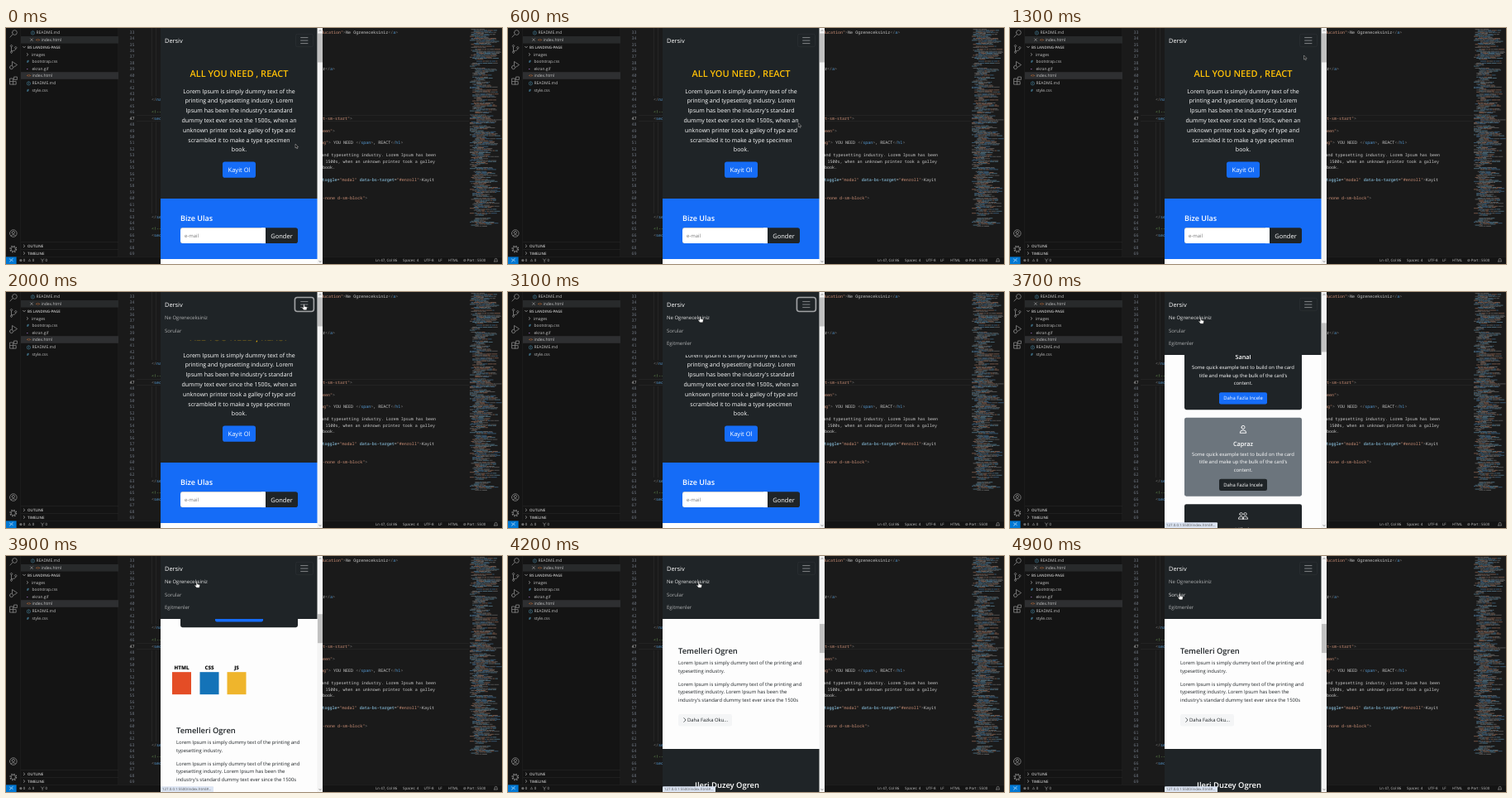
An HTML page that plays this animation: 600 px wide and 285 px high, repeating every 5000 ms.

```html
<!DOCTYPE html>
<html lang="tr">
<head>
<meta charset="utf-8">
<title>Landing page</title>
<style>
html, body { margin: 0; width: 100%; height: 100%; overflow: hidden; background: #1a1a1a; }
svg { display: block; }
text { font-family: "Open Sans", "Noto Sans", sans-serif; white-space: pre; text-rendering: geometricPrecision; }
.code { font-family: "Noto Sans Mono", "DejaVu Sans Mono", monospace; font-size: 5.02px; }
.mid { text-anchor: middle; }
.semi { font-weight: 600; }
.bold { font-weight: 800; }
</style>
</head>
<body>
<svg id="stage" width="600" height="285" viewBox="0 0 600 285"></svg>
<script>
const DARK = '#1f2427', BLUE = '#156cf7', WHITE = '#fff';
const stage = document.getElementById('stage');

// y is the visual middle of the line
const text = (x, y, str, size, fill, cls = '') =>
  `<text x="${x}" y="${y + size * 0.34}" font-size="${size}" fill="${fill}" class="${cls}">${str}</text>`;
const rect = (x, y, w, h, fill, r = 0) =>
  `<rect x="${x}" y="${y}" width="${w}" height="${h}" rx="${r}" fill="${fill}"/>`;
const line = (d, color, width = 0.8) =>
  `<path d="${d}" fill="none" stroke="${color}" stroke-width="${width}" stroke-linecap="round" stroke-linejoin="round"/>`;
const lines = (x, y, step, list, ...style) =>
  list.map((str, i) => text(x, y + i * step, str, ...style)).join('');

// ---------- code editor ----------
const rowY = n => 109 + (n - 47) * 7.43;
const escape = s => s.replace(/</g, '&lt;');
const INK = { s: '#ce9178', g: '#808080', w: '#cccccc', b: '#569cd6', a: '#9cdcfe', c: '#6a9955' };
// parts alternate colour key and string
function code(x, row, ...parts) {
  let spans = '';
  for (let i = 0; i < parts.length; i += 2)
    spans += `<tspan fill="${INK[parts[i]]}">${escape(parts[i + 1])}</tspan>`;
  return `<text class="code" x="${x}" y="${rowY(row) + 1.7}">${spans}</text>`;
}
const close = tag => ['g', '</', 'b', tag, 'g', '>'];

function minimap() {
  let seed = 7, out = '';
  const rnd = () => (seed = seed * 16807 % 2147483647) / 2147483647;
  const inks = ['#b07f68', '#4f82ab', '#8d8d8d', '#777', '#6c9fb8'];
  for (let y = 0.5; y < 240; y += 1.2) {
    if (rnd() < 0.1) continue;
    let x = 561 + Math.floor(rnd() * 6) * 1.6;
    const end = x + 6 + rnd() * 26;
    while (x < end && x < 593) {
      const w = 1.5 + rnd() * 6;
      out += `<path d="M${x.toFixed(1)} ${y.toFixed(1)}h${w.toFixed(1)}" stroke="${inks[Math.floor(rnd() * 5)]}" stroke-width=".75" opacity=".75"/>`;
      x += w + 0.5;
    }
  }
  return out;
}

function editor() {
  let out = rect(136, 0, 464, 276, '#1a1a1a');
  for (const x of [176, 181.5]) out += rect(x, 0, 0.5, 82, '#303030') + rect(x, 114, 0.5, 110, '#303030');
  out += rect(158, 105.2, 402, 0.4, '#303030') + rect(158, 112.6, 402, 0.4, '#303030');
  for (let n = 33; n < 70; n++)
    out += `<text class="code" x="149.5" y="${rowY(n) + 1.7}" fill="${n === 47 ? '#ccc' : '#6e7681'}">${n}</text>`;
  out += code(176, 44, ...close('nav')) + code(176, 46, 'c', '<!-- hero -->') +
    code(176, 47, 'g', '<', 'b', 'section') + code(176, 63, ...close('section')) +
    code(176, 65, 'c', '<!-- mail -->') + code(176, 66, 'g', '<', 'b', 'section') +
    code(381, 33, 's', 'ducation"', 'g', '>', 'w', 'Ne Ogreneceksiniz', ...close('a')) +
    code(380, 39, 'w', 'ar', ...close('a')) +
    code(383, 47, 's', 't-sm-start"', 'g', '>') +
    code(383, 49, 's', 'een"', 'g', '>') +
    code(381, 51, 's', 'ng"', 'g', '>', 'w', ' YOU NEED ', ...close('span'), 'w', ', REACT', ...close('h1')) +
    code(381.5, 53, 'w', 'and typesetting industry. Lorem Ipsum has been') +
    code(386.5, 54, 'w', '1500s, when an unknown printer took a galley') +
    code(383, 55, 'w', 'book.') +
    code(382.5, 57, 'a', 'toggle', 'w', '=', 's', '"modal"', 'a', ' data-bs-target', 'w', '=', 's', '"#enroll"', 'g', '>', 'w', 'Kayit') +
    code(383, 60, 's', '-none d-sm-block"', 'g', '>');
  return out + minimap();
}

function sidebar() {
  const ink = '#c4c4c4', dim = '#8a8a8a', size = 4.95;
  const file = (x, y, icon, color, name) =>
    text(x - 6.5, y, icon, 4.5, color, 'semi') + text(x, y, name, size, ink);
  const down = (x, y) => line(`M${x - 1.4} ${y - 0.7}l1.4 1.5 1.4-1.5`, ink, 0.6);
  const right = (x, y) => line(`M${x - 0.7} ${y - 1.4}l1.5 1.4-1.5 1.4`, ink, 0.6);
  return rect(0, 0, 136, 276, '#141414') + rect(17.6, 0, 0.4, 276, '#262626') + rect(135.6, 0, 0.4, 276, '#262626') +
    rect(18, 10, 118, 8.6, '#282a2b') + rect(18, 53.2, 118, 8.6, '#2e2f31') +
    file(36.5, 5.2, 'ⓘ', '#519aba', 'README.md') +
    line('M29.6 12.8l2.8 2.8m0-2.8l-2.8 2.8', ink, 0.5) + file(42.5, 14.2, '&lt;&gt;', '#e37933', 'index.html') +
    down(22, 23) + text(26, 23, 'BS LANDING-PAGE', 4.5, ink, 'semi') +
    right(26, 32) + text(31, 32, 'images', size, ink) +
    file(31.5, 40.4, '#', '#519aba', 'bootstrap.css') + file(31.5, 49, '▪', '#a074c4', 'ekran.gif') +
    file(31.5, 57.5, '&lt;&gt;', '#e37933', 'index.html') + file(31.5, 66, 'ⓘ', '#519aba', 'README.md') +
    file(31.5, 75, '#', '#519aba', 'style.css') +
    rect(18, 258.6, 118, 0.4, '#303030') + rect(18, 267.3, 118, 0.4, '#303030') +
    right(22, 263.3) + text(26, 263.3, 'OUTLINE', 4.5, ink, 'semi') +
    right(22, 272) + text(26, 272, 'TIMELINE', 4.5, ink, 'semi') +
    // activity icons
    line('M5 11l3-3.2M7.5 5.5a2.9 2.9 0 1 0 5.8 0a2.9 2.9 0 1 0-5.8 0', dim) +
    line('M6.5 23v5M6.5 22.9a1.2 1.2 0 1 1 .1 0M6.5 30.4a1.2 1.2 0 1 1 .1 0M11.7 25a1.2 1.2 0 1 1 .1 0q0 2.6-5.2 2.8', dim) +
    line('M7.5 45v-4.5l6 4-4 2.8M4.5 47.5a2 2.2 0 1 0 4 0a2 2.2 0 1 0-4 0', dim) +
    line('M5 61h3.6v3.6h3.6v3.5H5zM5 64.6h3.6v3.5M10 59h3.4v3.4H10z', dim) +
    line('M4.5 248a4.3 4.3 0 1 0 8.6 0a4.3 4.3 0 1 0-8.6 0M7.2 247a1.6 1.6 0 1 0 3.2 0a1.6 1.6 0 1 0-3.2 0M6 251q2.8-3 5.6 0', dim) +
    `<circle cx="8.8" cy="267" r="3.8" fill="none" stroke="${dim}" stroke-width="1.2" stroke-dasharray="1.5 1.48"/>` +
    `<circle cx="8.8" cy="267" r="2.7" fill="none" stroke="${dim}" stroke-width=".8"/>`;
}

function statusBar() {
  const put = (x, str) => text(x, 280.4, str, 4.45, '#c4c4c4');
  return rect(0, 276, 600, 9, '#141414') + rect(0, 276, 600, 0.4, '#2b2b2b') + rect(0, 276.4, 12.6, 8.6, '#0078d4') +
    line('M4.5 279l1.8 1.6-1.8 1.6M8.3 278.4l-1.8 1.6 1.8 1.6', WHITE, 0.6) +
    put(16, '⊗ 0') + put(26.5, '⚠ 0') + line('M42.5 278.8l1.6 2 1.6-2M44.1 280.8v2', '#bdbdbd', 0.5) + put(47.5, '0') +
    put(447, 'Ln 47, Col 86') + put(480, 'Spaces: 4') + put(505.5, 'UTF-8') + put(523, 'LF') + put(535, 'HTML') +
    put(553, '⊘ Port : 5500') + line('M590.6 282h4l-.6-1v-1.2q0-1.4-1.4-1.4t-1.4 1.4v1.2z', '#bdbdbd', 0.5);
}

// ---------- web page ----------
const person = (x, y, s = 1) =>
  `<g transform="translate(${x} ${y}) scale(${s})">` +
  line('M-2-2.3a2 2 0 1 0 4 0a2 2 0 1 0-4 0M-3.8 4.2q0-3 3.8-3t3.8 3z', WHITE, 0.9) + '</g>';
const laptop = y => line(`M278.5 ${y + 2}v-5.5h7v5.5M277 ${y + 3.4}h10`, WHITE, 0.9);

function card(y, title, icon, fill, button) {
  return rect(211, y, 142, 95, fill, 2.4) + icon +
    text(282, y + 31.5, title, 7.3, WHITE, 'mid semi') +
    lines(282, y + 44, 9.5, ['Some quick example text to build on the card', "title and make up the bulk of the card's", 'content.'], 5.9, WHITE, 'mid') +
    rect(253, y + 74, 58, 14.3, button, 2.2) + text(282, y + 81.2, 'Daha Fazla Incele', 5.9, WHITE, 'mid');
}

function page() {
  const badge = (x, name, color) =>
    text(x + 11.5, 651, name, 6.2, '#111', 'mid bold') + rect(x, 656, 23, 27, color);
  return rect(187, 0, 190, 206, DARK) +
    text(282, 54.8, 'ALL YOU NEED , REACT', 11, '#ffc107', 'mid semi') +
    lines(282, 76.3, 11.8, [
      'Lorem Ipsum is simply dummy text of the', 'printing and typesetting industry. Lorem',
      "Ipsum has been the industry's standard", 'dummy text ever since the 1500s, when an',
      'unknown printer took a galley of type and', 'scrambled it to make a type specimen', 'book.'
    ], 7, WHITE, 'mid') +
    rect(262, 161.5, 40, 19.2, BLUE, 2.8) + text(282, 171.3, 'Kayit Ol', 7.5, WHITE, 'mid') +
    rect(187, 206, 190, 73, BLUE) + text(211, 230.4, 'Bize Ulas', 9, WHITE, 'semi') +
    rect(211, 241.3, 142, 18.8, DARK, 2.8) + rect(211, 241.3, 103, 18.8, WHITE, 2.4) + rect(309, 241.3, 5, 18.8, WHITE) +
    text(216, 251.2, 'e-mail', 5.9, '#777') + text(333.5, 251, 'Gonder', 7.5, WHITE, 'mid') +
    card(298, 'Sanal', laptop(312), DARK, BLUE) +
    card(402.5, 'Capraz', person(282, 416.5), '#6c757d', DARK) +
    card(507, 'Hibrit', person(279.5, 521, 0.85) + person(284.5, 521, 0.85), DARK, BLUE) +
    badge(201, 'HTML', '#e44d26') + badge(234.5, 'CSS', '#1473b8') + badge(267.5, 'JS', '#efb52c') +
    text(206, 727, 'Temelleri Ogren', 9.35, DARK, 'semi') +
    lines(206, 741.3, 9.4, ['Lorem Ipsum is simply dummy text of the printing and', 'typesetting industry.'], 5.92, DARK) +
    lines(206, 766.7, 9.4, ['Lorem Ipsum is simply dummy text of the printing and', 'typesetting industry. Lorem Ipsum has been the', "industry's standard dummy text ever since the 1500s"], 5.92, DARK) +
    rect(206, 803, 65, 14.5, '#f4f5f6', 2.2) + line('M212.8 807.6l2.3 2.4-2.3 2.4', DARK, 0.7) +
    text(217, 810, 'Daha Fazka Oku...', 5.9, DARK) +
    rect(187, 845, 190, 80, DARK) + text(265, 889, 'Ileri Duzey Ogren', 9.38, WHITE, 'mid semi');
}

const LINKS = ['Ne Ogreneceksiniz', 'Sorular', 'Egitmenler'];
const linkY = i => 31 + i * 15.6;

stage.innerHTML = `
  <defs>
    <clipPath id="phone"><rect x="187" width="196" height="285"/></clipPath>
    <clipPath id="fold"><rect id="foldBox" x="187" width="190"/></clipPath>
  </defs>
  ${editor()}${sidebar()}${statusBar()}
  <g clip-path="url(#phone)">
    ${rect(187, 0, 196, 285, '#fdfdfd')}
    <g id="page">${page()}</g>
    <g clip-path="url(#fold)">
      ${rect(187, 0, 190, 76, DARK)}
      ${text(192, 15, 'Dersiv', 7.4, WHITE)}
      ${LINKS.map((s, i) => text(192, linkY(i), s, 6, WHITE, 'link')).join('')}
    </g>
    <rect x="350.5" y="7.3" width="21" height="15.4" rx="2" fill="none" stroke="#303538" stroke-width=".5"/>
    <rect id="ring" x="349.4" y="6.5" width="23" height="17" rx="3" fill="none" stroke="#a0a2a4" stroke-width="1.6"/>
    ${line('M356.6 11.6h8.4m-8.4 3.5h8.4m-8.4 3.5h8.4', '#9b9d9f', 0.8)}
    ${rect(376.5, 0, 6.5, 285, '#f4f4f4')}
    ${line('M378.8 3.8l1.2-1.4 1.2 1.4M378.8 281.4l1.2 1.4 1.2-1.4', '#777', 0.7)}
    <rect id="thumb" x="377" width="6" height="35" fill="#c1c1c1"/>
    <g id="status">${rect(187, 278.3, 64, 7, '#dbe4f3', 1)}${text(189, 281.8, '127.0.0.1:5500/index.html#...', 4.4, '#555')}</g>
  </g>
  <path id="arrow" d="M0 0v5l1.1-1 .8 1.8.9-.4-.8-1.7h1.6z" fill="#111" stroke="#ccc" stroke-width=".45"/>
  <path id="hand" d="M-.7 0q.8-.8 1.4 0v2.4l2.6.6q.6.3.4 1.2l-.6 2.6h-3.4l-2.3-2.7q.3-1 1.9 0z" fill="#fff" stroke="#111" stroke-width=".4"/>`;

// ---------- motion ----------
const el = id => document.getElementById(id);
const links = [...document.querySelectorAll('.link')];
const ease = (t, start, length) => {
  const k = Math.min(1, Math.max(0, (t - start) / length));
  return k * k * (3 - 2 * k);
};
// start, end, x, y reached at the end
const MOVES = [[300, 1250, 355.5, 33], [1350, 1700, 360.5, 15], [2350, 3050, 232.5, 30], [3100, 3400, 230.8, 31.5], [4350, 4800, 205.5, 46]];

function pointer(t) {
  let x = 350, y = 140;
  for (const [a, b, toX, toY] of MOVES) {
    const k = ease(t, a, b - a);
    x += (toX - x) * k;
    y += (toY - y) * k;
  }
  return [x, y];
}

function draw(t) {
  const [x, y] = pointer(t);
  const scroll = 612 * ease(t, 3416, 646);
  const fold = 27 + 49 * ease(t, 1790, 350);
  el('page').setAttribute('transform', `translate(0 ${-scroll})`);
  el('thumb').setAttribute('y', 6.5 + scroll / 8.1);
  el('foldBox').setAttribute('height', fold);
  el('ring').setAttribute('opacity', ease(t, 1790, 150) - ease(t, 3380, 150));
  el('status').setAttribute('visibility', t >= 3400 ? 'visible' : 'hidden');

  const open = fold > 70;
  links.forEach((node, i) => {
    const over = open && Math.abs(y - linkY(i)) < 7.8;
    node.setAttribute('fill-opacity', over ? 0.88 : 0.64);
  });
  const onToggler = x > 350 && y > 7 && y < 23;
  const hand = onToggler || (open && y >= 23);
  for (const id of ['arrow', 'hand']) {
    el(id).setAttribute('transform', `translate(${x} ${y})`);
    el(id).setAttribute('visibility', (id === 'hand') === hand ? 'visible' : 'hidden');
  }
}

const begin = performance.now();
function tick(now) {
  const t = Math.max(0, now - begin) % 5000;
  draw(Math.floor(t / 100) * 100);
  requestAnimationFrame(tick);
}
draw(0);
requestAnimationFrame(tick);
</script>
</body>
</html>
```
